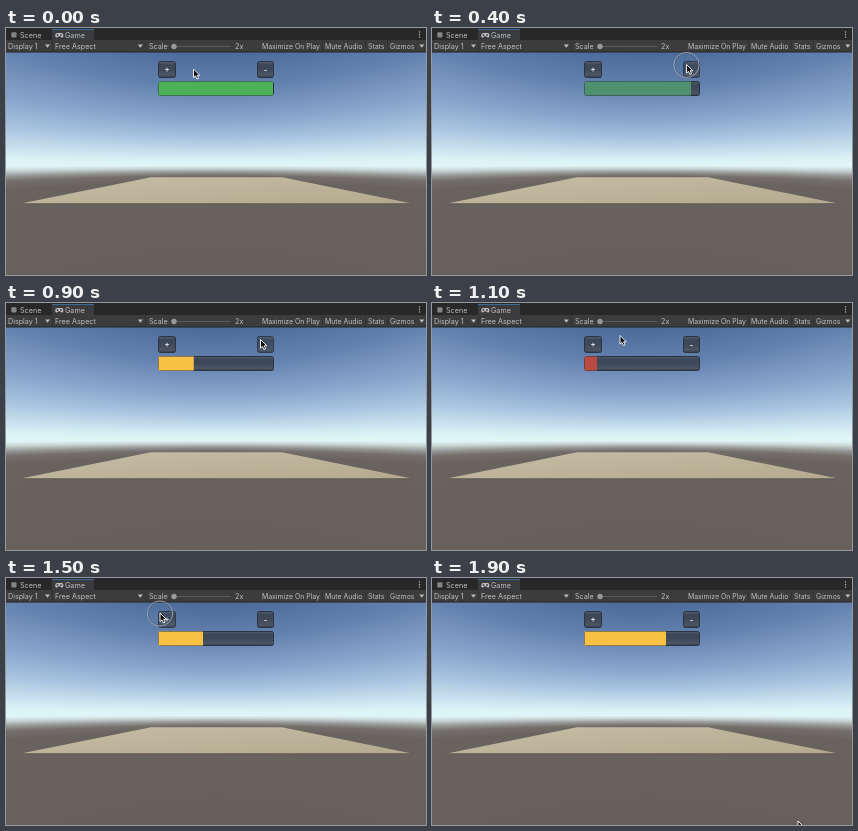
An HTML page with a canvas that plays this animation: 420 by 247 pixels, repeating every 2000 ms.

```html
<!DOCTYPE html>
<html lang="en">
<head>
<meta charset="utf-8">
<title>Health bar</title>
<style>
  html, body { margin: 0; width: 100%; height: 100%; overflow: hidden; background: #282828; }
  canvas, svg { position: absolute; left: 0; top: 0; width: 420px; height: 247px; }
  text { font: 7.2px Inter, sans-serif; fill: #c0c0c0; }
  .small { font-size: 6.9px; }
  .sign { font: 700 7.5px Inter, sans-serif; fill: #e4e8ec; text-anchor: middle; }
</style>
</head>
<body>
<canvas id="sky" width="420" height="247"></canvas>
<svg viewBox="0 0 420 247">
  <defs>
    <linearGradient id="ground" x2="1" y2="1">
      <stop offset="0" stop-color="#c6bda5"/>
      <stop offset="1" stop-color="#b5aa8f"/>
    </linearGradient>
    <linearGradient id="slate" x2="0" y2="1">
      <stop offset="0" stop-color="#536072"/>
      <stop offset=".2" stop-color="#3b4657"/>
      <stop offset=".5" stop-color="#3e4858"/>
      <stop offset=".85" stop-color="#4c5564"/>
      <stop offset="1" stop-color="#343b48"/>
    </linearGradient>
  </defs>

  <path d="M145 149.3H276L406 175.6H15Z" fill="url(#ground)"/>
  <path d="M15 175.8H406" stroke="#57514a" stroke-width=".7"/>

  <rect width="420" height="12.5" fill="#282828"/>
  <rect y="12" width="420" height="12" fill="#3c3c3c"/>
  <rect y="23.5" width="420" height="1" fill="#242424"/>
  <rect x="46" y="1" width="42" height="11.5" fill="#393b3e"/>
  <rect x="46" y="1" width="42" height="1" fill="#3b6a9c"/>
  <rect x="5.3" y="4.2" width="5.2" height="5.4" rx="1" fill="#858585"/>
  <path d="M51 5H55.5Q57.5 5 57.3 8Q57 10.5 55 9L54 8.3H52.5L51.3 9.3Q49.3 10.3 49.2 7.5Q49.3 5 51 5Z" fill="#c0c0c0"/>
  <circle cx="51.5" cy="7" r=".9" fill="#3c3c3c"/>
  <circle cx="55" cy="7" r=".9" fill="#3c3c3c"/>
  <g fill="#bcbcbc">
    <circle cx="413.5" cy="4" r=".7"/><circle cx="413.5" cy="6.5" r=".7"/><circle cx="413.5" cy="9" r=".7"/>
    <path d="M39 16.5h5l-2.5 3.2zM131.8 16.5h5l-2.5 3.2zM413.3 16.5h5l-2.5 3.2z"/>
  </g>
  <path d="M46.5 12.5V23.5M139.5 12.5V23.5M316.5 12.5V23.5M359.5 12.5V23.5M381.5 12.5V23.5" stroke="#303030" stroke-width=".8"/>
  <path d="M166 18.5H225" stroke="#5c5c5c"/>
  <circle cx="168" cy="18.5" r="2.7" fill="#999"/>
  <g id="labels"></g>

  <g id="plus">
    <rect x="152.5" y="33.5" width="17" height="16" rx="2" fill="url(#slate)" stroke="#2a3340"/>
    <text class="sign" x="161" y="44.4">+</text>
  </g>
  <g id="minus">
    <rect x="251.500" y="33.5" width="16" height="16" rx="2" fill="url(#slate)" stroke="#2a3340"/>
    <text class="sign" x="259.5" y="45">-</text>
  </g>
  <rect x="152.5" y="53.5" width="115" height="14" rx="2" fill="url(#slate)" stroke="#2a3340"/>
  <rect id="fill" x="152.5" y="53.5" height="14"/>

  <g id="ring" fill="none">
    <circle r="11.8" stroke="#46536a" opacity=".6"/>
    <circle r="12.6" stroke="#a9aeb4" stroke-width=".8"/>
  </g>
  <path id="cursor" d="M0 0V8.600L2 6.900L3.400 10L5 9.300L3.700 6.300H6.300Z" fill="#111" stroke="#fff" stroke-width=".9"/>
</svg>
<script>
const $ = id => document.getElementById(id);
const LOOP = 2000, STEP = 100;
const BAR_LEFT = 152, BAR_WIDTH = 116;

const labels = [["Scene", 14, 9.7], ["Game", 59, 9.7], ["Display 1", 2, 21], ["Free Aspect", 49, 21],
  ["Scale", 143, 21], ["2x", 229, 21], ["Maximize On Play", 256, 21, "small"],
  ["Mute Audio", 319, 21, "small"], ["Stats", 362, 21, "small"], ["Gizmos", 384, 21, "small"]];
$("labels").innerHTML = labels.map(([text, x, y, style = ""]) =>
  `<text class="${style}" x="${x}" y="${y}">${text}</text>`).join("");

// Sky colours by distance below the horizon, at the middle of the view.
const HORIZON = 135.5, FOCAL = 193, SPAN = 112;
const skyStops = [[-112, "#4b6a99"], [-75, "#6482af"], [-45, "#86a4cb"], [-25, "#a7c3df"], [-11, "#c8e1ee"],
  [-3, "#dbf3f6"], [2, "#e0f5f5"], [5, "#c7d4d3"], [8.5, "#979897"], [12, "#746f6c"], [18, "#69635f"], [112, "#66605c"]];

// Lines of equal elevation bend away from the horizon towards the sides.
function paintSky() {
  const ctx = $("sky").getContext("2d");
  const gradient = ctx.createLinearGradient(0, -SPAN, 0, SPAN);
  for (const [y, color] of skyStops) gradient.addColorStop((y + SPAN) / (2 * SPAN), color);
  ctx.fillStyle = gradient;
  for (let x = 0; x < 420; x++) {
    ctx.setTransform(1, 0, 0, Math.hypot(1, (x - 210) / FOCAL), x, HORIZON);
    ctx.fillRect(0, -SPAN, 1, 2 * SPAN);
  }
}

// Keys are [time, ...values]; values are interpolated linearly.
const barKeys = [[0, 267], [300, 267], [400, 259], [600, 235], [1000, 172], [1100, 165],
  [1300, 165], [1700, 229], [1800, 234], [2000, 234]];
const cursorKeys = [[0, 187.5, 41], [100, 195, 41], [300, 254.5, 36.5], [900, 254.5, 36.5],
  [1000, 236, 34], [1100, 188, 32.5], [1300, 154, 35], [1700, 154, 35],
  [1800, 205, 85], [1900, 366, 243], [2000, 366, 243]];

function sample(keys, t) {
  const i = keys.findIndex(key => key[0] > t);
  const [a, b] = [keys[i - 1], keys[i]];
  const k = (t - a[0]) / (b[0] - a[0]);
  return a.slice(1).map((v, n) => v + (b[n + 1] - v) * k);
}

function barColor(level, t) {
  if (level < .24) return "#b94b43";
  if (level < .75) return "#f7c146";
  return t >= 400 && t < 600 ? "#4f9070" : "#4daf58";
}

function draw(now) {
  const t = Math.floor(now % LOOP / STEP) * STEP;
  const [edge] = sample(barKeys, t);
  const [x, y] = sample(cursorKeys, t);
  $("fill").setAttribute("width", edge - BAR_LEFT - .5);
  $("fill").setAttribute("fill", barColor((edge - BAR_LEFT) / BAR_WIDTH, t));
  $("cursor").setAttribute("transform", `translate(${x} ${y})`);
  $("ring").setAttribute("transform", `translate(${x} ${y + .5})`);
  $("ring").style.display = t === 400 || t === 1500 ? "" : "none";
  $("minus").style.opacity = t >= 300 && t < 1000 ? .88 : 1;
  $("plus").style.opacity = t >= 1300 && t < 1800 ? .88 : 1;
  requestAnimationFrame(() => draw(performance.now() - start));
}
const start = performance.now();
paintSky();
draw(0);
</script>
</body>
</html>
```
